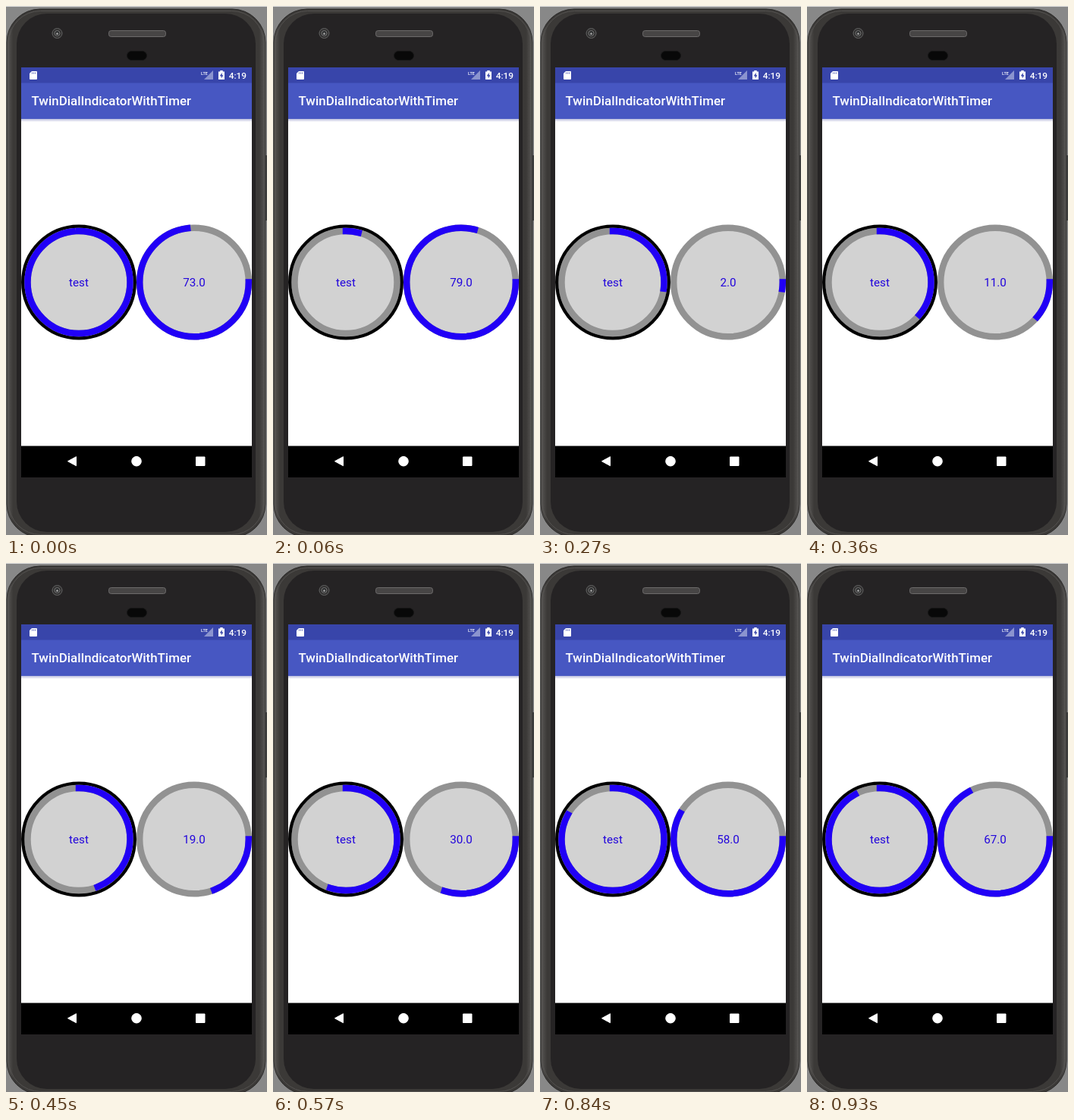
Write an HTML page that moves like this. It is 344x698 px and loops after 0.96 s.

```html
<!DOCTYPE html>
<html lang="en">
<head>
<meta charset="utf-8">
<title>Dial progress</title>
<style>
  html, body { margin: 0; width: 100%; height: 100%; overflow: hidden; background: #888; }
  svg { display: block; font-family: Roboto, sans-serif; }
  .disc { fill: #d2d2d2; stroke: #929292; stroke-width: 8.44; }
  .arc { fill: none; stroke: #2100f6; stroke-width: 8.44; stroke-linecap: square; }
  .label { fill: #2205dc; font-size: 15.2px; text-anchor: middle; }
  .medium { fill: #fff; font-weight: 500; }
</style>
</head>
<body>
<svg width="344" height="698" viewBox="0 0 344 698">
  <defs>
    <linearGradient id="rim">
      <stop offset="0" stop-color="#595755"/>
      <stop offset=".025" stop-color="#3b3937"/>
      <stop offset=".975" stop-color="#3b3937"/>
      <stop offset="1" stop-color="#595755"/>
    </linearGradient>
    <linearGradient id="shade" x2="0" y2="1">
      <stop stop-color="#b9bddd"/>
      <stop offset="1" stop-color="#fff"/>
    </linearGradient>
  </defs>

  <!-- Phone body -->
  <rect width="344" height="698" fill="#888"/>
  <rect width="344" height="1" fill="#ddd"/>
  <rect x="341" y="197" width="3" height="86" fill="#444"/>
  <rect x="1" y="4" width="341" height="697" rx="44" fill="url(#rim)" stroke="#2b2a29"/>
  <rect x="3.5" y="6.5" width="336" height="691" rx="42" fill="none" stroke="#545250"/>
  <rect x="14" y="10" width="315" height="684" rx="40" fill="#252324"/>
  <circle cx="67.5" cy="36" r="6.5" fill="#323131" stroke="#636363"/>
  <circle cx="67.5" cy="36" r="3.5" fill="#292a2b" stroke="#777"/>
  <circle cx="67.5" cy="36.5" r="1.5" fill="#999"/>
  <rect x="135.5" y="32.5" width="75" height="8" rx="3" fill="#474545" stroke="#6c6a6a"/>
  <rect x="159.5" y="59.5" width="26" height="12" rx="6" fill="#080808" stroke="#171717"/>

  <!-- Status bar and toolbar -->
  <rect x="20" y="81" width="304" height="541" fill="#fff"/>
  <rect x="20" y="81" width="304" height="21" fill="#3845aa"/>
  <rect x="20" y="101.5" width="304" height="47.5" fill="#4757c2"/>
  <rect x="20" y="149" width="304" height="4" fill="url(#shade)"/>
  <path d="M34 86h6a1 1 0 0 1 1 1v9a1 1 0 0 1-1 1h-8a1 1 0 0 1-1-1v-7z" fill="#fff"/>
  <path d="M34.5 87.5v2m2-2v2m2-2v2" stroke="#3845aa" stroke-width=".8"/>
  <path d="M273 85v12h-12z" fill="#8b94cf"/>
  <text class="medium" x="257" y="90.5" font-size="5.5">LTE</text>
  <path d="M280 86.5h2.3V85h3.4v1.5h2.3V97h-8z" fill="#fff"/>
  <path d="M284.7 88l-3 4.5h2v3l2.8-4.3h-1.8z" fill="#3845aa"/>
  <text class="medium" x="293.7" y="95.6" font-size="11.8">4:19</text>
  <text class="medium" x="33.5" y="131" font-size="16.9">TwinDialIndicatorWithTimer</text>

  <!-- Dials -->
  <g transform="translate(96 364.5)">
    <circle class="disc" r="67.5"/>
    <circle r="73.8" fill="none" stroke="#000" stroke-width="4.3"/>
    <circle id="leftArc" class="arc" r="67.5" pathLength="100" transform="rotate(-90)"/>
    <text class="label" y="5.2">test</text>
  </g>
  <g transform="translate(248 364.5)">
    <circle class="disc" r="71.8"/>
    <circle id="rightArc" class="arc" r="71.8" pathLength="100"/>
    <text id="count" class="label" y="5.2"></text>
  </g>

  <!-- Navigation bar -->
  <rect x="20" y="580.5" width="304" height="41.5" fill="#000"/>
  <g fill="#fff" stroke="#fff" stroke-linejoin="round">
    <path d="M81.5 600.7l11-6v12z"/>
    <circle cx="172" cy="600.7" r="6.3"/>
    <rect x="250.5" y="595" width="11.5" height="11.5"/>
  </g>
</svg>
<script>
  const STEP = 30, STEPS = 32;
  // [step, progress]; progress keeps counting past 100 and wraps when shown
  const keys = [[0, 73], [5, 88], [9, 102], [15, 119], [19, 130], [24, 147], [31, 167]];
  const [leftArc, rightArc, count] =
    ['leftArc', 'rightArc', 'count'].map(id => document.getElementById(id));

  function progressAt(step) {
    const next = Math.max(1, keys.findIndex(([s]) => s >= step));
    const [s0, v0] = keys[next - 1], [s1, v1] = keys[next];
    return Math.round(v0 + (v1 - v0) * (step - s0) / (s1 - s0));
  }

  function sweep(arc, percent) {
    arc.setAttribute('stroke-dasharray', `${percent} 200`);
  }

  function draw() {
    const progress = progressAt(Math.floor(performance.now() / STEP) % STEPS);
    sweep(leftArc, (progress + 25) % 100);
    sweep(rightArc, progress % 100);
    count.textContent = (progress % 100).toFixed(1);
    requestAnimationFrame(draw);
  }
  draw();
</script>
</body>
</html>
```
